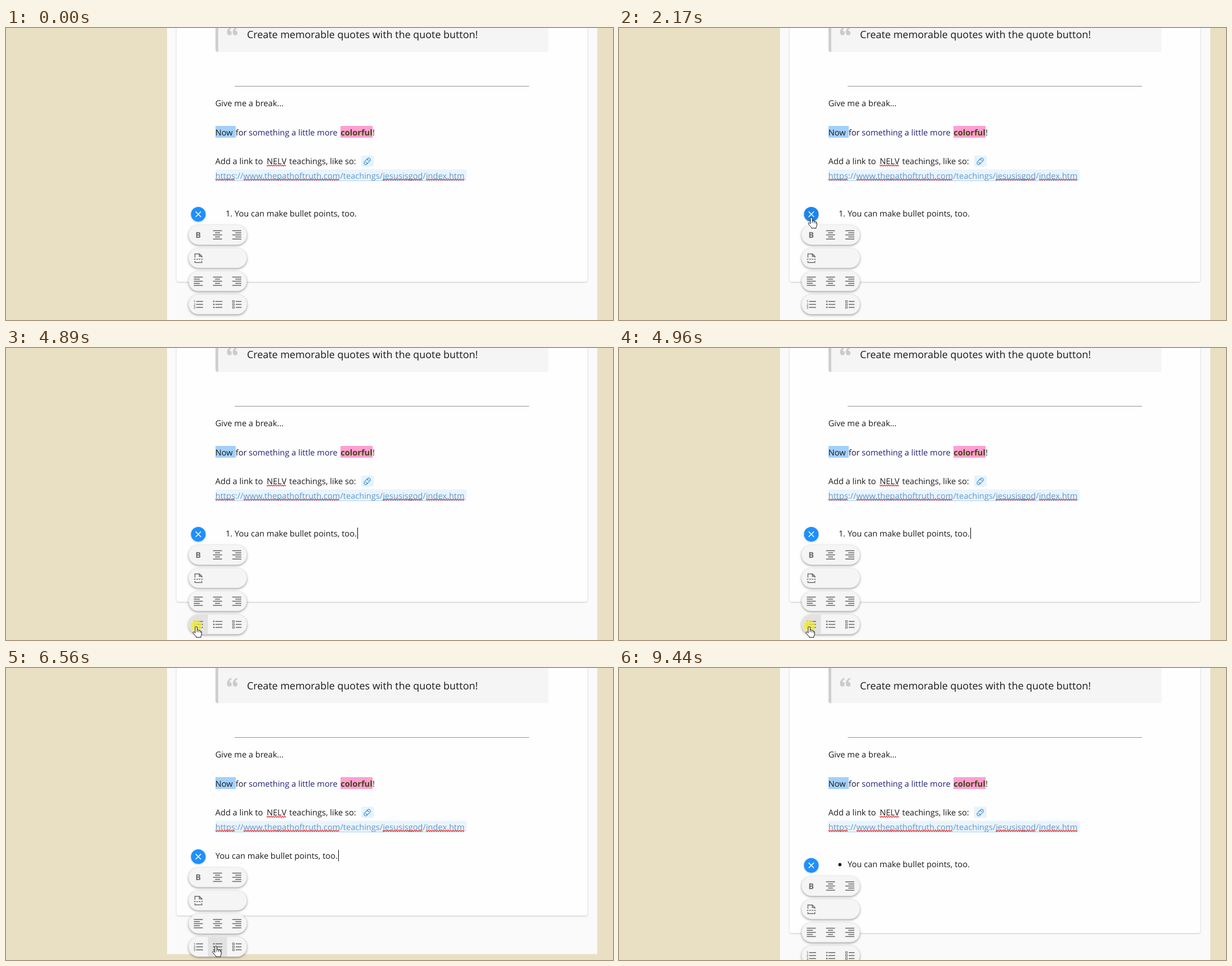
Recreate the animation shown at these times as an HTML page with a canvas. Size 1078 by 519 pixels, loop 9690 ms.

```html
<!DOCTYPE html>
<html lang="en">
<head>
<meta charset="utf-8">
<title>Editor list buttons</title>
<style>
html, body { margin: 0; width: 100%; height: 100%; overflow: hidden; background: #e9e0c4; }
canvas { display: block; }
</style>
</head>
<body>
<canvas id="stage" width="1078" height="519"></canvas>
<script>
const ctx = document.getElementById('stage').getContext('2d');
const LOOP = 9690, TO_TEXT = 5040, TO_BULLET = 6790;
const SANS = '"Open Sans", "Noto Sans", sans-serif';
const BODY = '14.6px ' + SANS, BOLD = 'bold 14.6px ' + SANS;
const INK = '#1b1b1b', GREY = '#6c6c6c';
const ITEM = 34.2, PILL_X = 324.3, PILL_W = 103.4, PILL_H = 35, PITCH = 41.2;

// Pointer track: time, x, y
const TRACK = [
  [750, 716, 510], [870, 645, 499], [1000, 540, 486], [1180, 425, 476], [1300, 386, 471],
  [1380, 375, 468], [1500, 351, 452], [1690, 340, 423], [1850, 341, 385], [2050, 342, 345],
  [2250, 342, 331], [3100, 342, 332], [3260, 344, 372], [3340, 345, 394.5], [3600, 343, 440],
  [3850, 338, 482], [4020, 337, 494], [4380, 337, 494.5], [4420, 338, 495], [5480, 338, 495],
  [5700, 341, 508], [5900, 352, 514], [6240, 374, 500], [6410, 374, 499], [6480, 374, 499],
  [6560, 373, 494], [7600, 373, 494], [7670, 373, 498.5], [7750, 366, 507], [7900, 350, 512],
  [8240, 350, 512], [8350, 349, 511], [8530, 349, 511], [8600, 362, 511], [8740, 430, 519]
];

function pointerAt(t) {
  if (t < TRACK[0][0] || t > 8740) return null;
  const i = Math.max(1, TRACK.findIndex(k => k[0] >= t));
  const [t0, x0, y0] = TRACK[i - 1], [t1, x1, y1] = TRACK[i];
  const p = (t - t0) / (t1 - t0);
  return { x: x0 + (x1 - x0) * p, y: y0 + (y1 - y0) * p };
}

// Document geometry for each list state
function layoutAt(t) {
  if (t < TO_TEXT) return { kind: 'number', dy: 0, button: 331, line: 334.7, card: 451, panel: 600, textX: 406, caretX: 624.5 };
  if (t < TO_BULLET) return { kind: 'plain', dy: 20, button: 335.3, line: 339, card: 440, panel: 508.6, textX: 372, caretX: 590.5 };
  return { kind: 'bullet', dy: 20, button: 350.8, line: 354.4, card: 471, panel: 600, textX: 406, caretX: 624.5 };
}

const pillTop = (lay, row) => lay.button + 36.7 - PILL_H / 2 + row * PITCH;

function hit(p, lay) {
  if (!p) return null;
  if (Math.hypot(p.x - 341.5, p.y - lay.button) < 13) return { row: -1 };
  for (let row = 0; row < 4; row++) {
    const y = p.y - pillTop(lay, row), col = Math.floor((p.x - PILL_X) / ITEM);
    if (y >= 0 && y <= PILL_H && col >= 0 && col < (row === 1 ? 1 : 3)) return { row, col };
  }
  return null;
}

function caretOn(t) {
  if (t < 4820) return false;
  if (t < 5590) return true;
  if (t < TO_BULLET) return t >= 6130 && t < 6700;
  return t < 7350 || (t >= 7900 && t < 8350) || (t >= 8900 && t < 9440);
}

function rect(x, y, w, h, fill, r = 0) {
  ctx.fillStyle = fill;
  ctx.beginPath();
  ctx.roundRect(x, y, w, h, r);
  ctx.fill();
}

function dot(x, y, r, fill) {
  ctx.fillStyle = fill;
  ctx.beginPath();
  ctx.arc(x, y, r, 0, Math.PI * 2);
  ctx.fill();
}

function shadow(alpha, blur, dy, draw) {
  ctx.save();
  ctx.shadowColor = `rgba(0,0,0,${alpha})`;
  ctx.shadowBlur = blur;
  ctx.shadowOffsetY = dy;
  draw();
  ctx.restore();
}

function text(s, x, y, color = INK, font = BODY) {
  ctx.font = font;
  ctx.fillStyle = color;
  ctx.fillText(s, x, y);
}

function width(s, font = BODY) {
  ctx.font = font;
  return ctx.measureText(s).width;
}

function path(d, color, w) {
  ctx.strokeStyle = color;
  ctx.lineWidth = w;
  ctx.stroke(new Path2D(d));
}

function squiggle(x, w, y) {
  ctx.beginPath();
  for (let i = 0; i <= w; i += 2) ctx.lineTo(x + i, y + (i % 4 ? .9 : -.9));
  ctx.strokeStyle = '#e02a2e';
  ctx.lineWidth = 1.3;
  ctx.stroke();
}

function at(x, y, draw) {
  ctx.save();
  ctx.translate(x, y);
  draw();
  ctx.restore();
}

function quoteMark(x, y) {
  at(x, y, () => {
    ctx.fillStyle = '#cbcbcb';
    ctx.fill(new Path2D('M7.5 0C2.5 1.8 0 5.8 0 10.5C0 13.7 1.7 15.4 4.2 15.4A3.9 3.9 0 0 0 4.6 7.6C4.3 5.4 5.8 3.4 8.4 2.2Z'));
  });
}

function linkIcon(x, y) {
  at(x, y, () => {
    ctx.rotate(-Math.PI / 4);
    ctx.lineCap = 'round';
    path('M-1 3H-3.8A3 3 0 0 1 -3.8 -3H.4A3 3 0 0 1 3 .8M1 -3H3.8A3 3 0 0 1 3.8 3H-.4A3 3 0 0 1 -3 -.8', '#3f8fd2', 1.2);
  });
}

function page(lay) {
  rect(0, 0, 1078, 519, '#e9e0c4');
  rect(286, 0, 764, lay.panel, '#fafafa');
  shadow(.2, 3, 1, () => rect(303, -20, 729.5, lay.card + 20, '#fefefe', 4));

  at(0, lay.dy, () => {
    rect(372, -60, 591.5, 102.5, '#f5f5f5', 4);
    rect(372, -60, 5, 102.5, '#cfcfcf', [4, 0, 0, 4]);
    quoteMark(392.5, -2.5);
    quoteMark(402.8, -2.5);
    text('Create memorable quotes with the quote button!', 428, 18, INK, '17.9px ' + SANS);
    rect(406, 103, 523, 1, '#8f9396');
    text('Give me a break...', 371.7, 139);

    rect(372, 174, 36, 21, '#a3d0fb');
    rect(594, 174, 57, 21, '#ff9fd3');
    text('Now', 371.7, 190.5);
    text('for', 407.7, 190.5, '#171733');
    text('something a little more', 431, 190.5, '#232378');
    text('colorful', 594.3, 190.5, '#424613', BOLD);
    text('!', 651, 190.5);

    text('Add a link to', 371.7, 242);
    text('NELV', 463, 242);
    squiggle(463, 35, 244.5);
    text('teachings, like so:', 503, 242);
    rect(630.5, 226.5, 22.5, 20, '#e6f3fd', 3);
    linkIcon(641.5, 237);
    link();
  });

  if (lay.kind === 'number') text('1.', 390, lay.line);
  if (lay.kind === 'bullet') dot(392.3, lay.line - 5, 2.8, INK);
  text('You can make bullet points, too.', lay.textX, lay.line);
}

function link() {
  const url = 'https://www.thepathoftruth.com/teachings/jesusisgod/index.htm';
  rect(372, 251.5, 446, 20.5, '#e9f4fd', 3);
  text(url, 371.7, 267.5, '#6498c6');
  ctx.save();
  ctx.setLineDash([1, 1]);
  path('M372 271.5H813.5', '#78aedb', 1);
  ctx.restore();
  for (const part of ['https', 'www.thepathoftruth.com', 'jesusisgod', 'index.htm']) {
    squiggle(372 + width(url.slice(0, url.indexOf(part))), width(part), 269.5);
  }
}

// Icons are drawn around their centre
function alignIcon(side) {
  const shortW = side ? 12 : 10;
  for (let i = -2; i <= 2; i++) {
    const w = (i % 2 ? shortW : 18) * .89;
    const x = side < 0 ? -8 : side > 0 ? 8 - w : -w / 2;
    rect(x, i * 3.7 - .8, w, 1.6, GREY);
  }
}

function listIcon(kind) {
  const left = kind === 2 ? -2 : -3.8;
  for (let i = -1; i <= 1; i++) {
    const y = i * 5.3;
    rect(left, y - .8, 8.4 - left, 1.6, GREY);
    if (kind === 0) text(String(i + 2), -8.6, y + 2.2, GREY, '600 6px ' + SANS);
    if (kind === 1) dot(-6.6, y, 1.4, GREY);
    if (kind === 2) {
      ctx.strokeStyle = GREY;
      ctx.lineWidth = 1;
      ctx.strokeRect(-7.5, y - 1.5, 3, 3);
    }
  }
}

function breakIcon() {
  path('M-6 -1V-7.5H2L6.5 -3V-1M1.8 -7.5V-3H6.5M-6 5V7.8H6.3V5', GREY, 1.5);
  ctx.setLineDash([2.8, 1.5]);
  path('M-7.8 2H8', GREY, 1.5);
}

const ICONS = [
  [() => text('B', -5, 5, GREY, 'bold 14.3px ' + SANS), () => alignIcon(0), () => alignIcon(1)],
  [breakIcon],
  [() => alignIcon(-1), () => alignIcon(0), () => alignIcon(1)],
  [() => listIcon(0), () => listIcon(1), () => listIcon(2)]
];

function pressShade(t) {
  for (const start of [TO_TEXT, TO_BULLET]) {
    const p = (t - start) / 240;
    if (p >= 0 && p < 1) return Math.round(200 + 26 * p * p);
  }
  return 226;
}

function toolbar(lay, over, t) {
  const hot = over && over.row === -1;
  shadow(.25, 3, 1, () => dot(341.5, lay.button, 13, hot ? '#1b85ee' : '#1e90ff'));
  at(341.5, lay.button, () => path('M-4.7 -4.7L4.7 4.7M4.7 -4.7L-4.7 4.7', '#fff', 1.5));

  ICONS.forEach((icons, row) => {
    const y = pillTop(lay, row);
    shadow(.4, 4, 1.5, () => rect(PILL_X, y, PILL_W, PILL_H, '#f5f5f5', 17.5));
    if (over && over.row === row) {
      const s = pressShade(t), c = over.col;
      const r = c === 0 ? [17.5, 0, 0, 17.5] : c === 2 ? [0, 17.5, 17.5, 0] : 0;
      rect(PILL_X + c * ITEM, y, ITEM, PILL_H, `rgb(${s},${s},${s})`, r);
    }
    icons.forEach((draw, col) => at(341.5 + col * ITEM, y + PILL_H / 2, draw));
  });
}

const HAND = new Path2D('M-2 11.5V2Q-2 .3 -.3 .3Q1.5 .3 1.5 2V6.7Q2 5.8 3.2 6Q4.6 6.2 4.6 7.6Q5.2 6.6 6.3 7Q7.6 7.4 7.6 8.6Q9.3 8.3 9.3 10V14Q9.3 16 8 17.6V19.3H-.2V17.8Q-3.2 15.2 -5.8 11.4Q-6.2 9.5 -4.4 9.5Q-3.2 9.8 -2 11.5Z');
const KNUCKLES = 'M1.5 6.7V10M4.6 7.6V10.5M7.6 8.6V11';
const ARROW = new Path2D('M.4 .4V13.8L3.4 11L5.5 16L7.6 15.1L5.5 10.2H9.6Z');

function pointer(p, hand) {
  at(p.x, p.y, () => {
    const shape = hand ? HAND : ARROW;
    ctx.lineJoin = 'round';
    ctx.fillStyle = '#fff';
    ctx.fill(shape);
    ctx.strokeStyle = '#111';
    ctx.lineWidth = 1;
    ctx.stroke(shape);
    if (hand) path(KNUCKLES, '#111', .9);
  });
}

function draw(t) {
  const lay = layoutAt(t), p = pointerAt(t);
  page(lay);
  // Button highlight trails the pointer slightly
  toolbar(lay, hit(pointerAt(t - 80), lay), t);
  if (caretOn(t)) rect(lay.caretX - .5, lay.line - 15.5, 1, 20, '#000');
  const clicking = (t >= 4820 && t < 5030) || (t >= 6710 && t < TO_BULLET);
  if (p && clicking) dot(p.x, p.y - 1, 10.3, 'rgba(243,238,50,.75)');
  if (p) pointer(p, hit(p, lay));
}

ctx.textRendering = 'geometricPrecision';
const begin = performance.now();
function tick() {
  draw((performance.now() - begin) % LOOP);
  requestAnimationFrame(tick);
}
tick();
</script>
</body>
</html>
```
